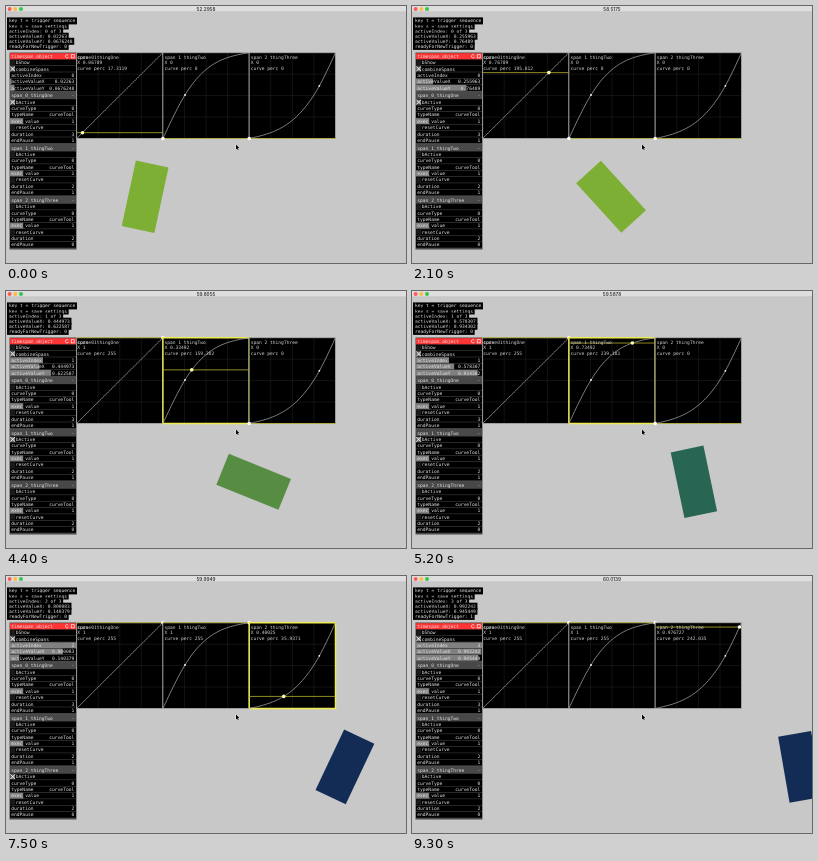
Write an HTML page with a canvas that moves like this. It is 400 px wide and 257 px high and loops after 9.4 s.

```html
<!DOCTYPE html>
<html lang="en">
<head>
<meta charset="utf-8">
<title>Timespan curves</title>
<style>
html, body { margin: 0; width: 100%; height: 100%; overflow: hidden; background: #c8c8c8; }
canvas { display: block; }
</style>
</head>
<body>
<canvas id="stage" width="400" height="257"></canvas>
<script>
const ctx = document.getElementById('stage').getContext('2d');
const LOOP = 9400, STEP = 100;
const ROW = 6.35, GUI_X = 4, GUI_W = 66;
const PLOT = { x: 70.6, y: 46.7, w: 86.3, h: 85.8 };

// knot: middle point of a natural cubic spline from (0,0) to (1,1)
const spans = [
  { name: 'thingOne', start: -0.20367, length: 3, end: 1, pause: 1, knot: null },
  { name: 'thingTwo', start: 3.73016, length: 2, end: 1, pause: 1, knot: [0.256, 0.5072] },
  { name: 'thingThree', start: 6.6995, length: 2, end: 0.976727, pause: 0, knot: [0.813, 0.614] }
];
const FINISH = 8.654;
const fpsKeys = [[0, 52.2958], [2.1, 58.5175], [3.6, 60.0232], [5.2, 59.5878],
  [6.8, 59.9831], [8.2, 60.0067], [9.3, 60.0139]];
const GREEN = [125, 175, 52], TEAL = [41, 101, 83], NAVY = [18, 44, 86];

const mix = (a, b, k) => a + (b - a) * k;
const clamp = (v, lo, hi) => Math.min(hi, Math.max(lo, v));
const num = v => String(Number(v.toPrecision(6)));

function curve(knot, x) {
  if (!knot) return x;
  const [a, b] = knot;
  const left = b / a, right = (1 - b) / (1 - a), bend = 3 * (right - left);
  if (x < a) return (left - a * bend / 6) * x + bend / (6 * a) * x ** 3;
  const u = 1 - x;
  return 1 - (right + (1 - a) * bend / 6) * u + bend / (6 * (1 - a)) * u ** 3;
}

function fpsAt(t) {
  const i = Math.max(1, fpsKeys.findIndex(k => k[0] >= t));
  const [t0, v0] = fpsKeys[i - 1], [t1, v1] = fpsKeys[i];
  return mix(v0, v1, (t - t0) / (t1 - t0));
}

function rect(x, y, w, h, fill) {
  ctx.fillStyle = fill;
  ctx.fillRect(x, y, w, h);
}

function dot(x, y, r, fill) {
  ctx.fillStyle = fill;
  ctx.beginPath();
  ctx.arc(x, y, r, 0, Math.PI * 2);
  ctx.fill();
}

function line(points, stroke, width) {
  ctx.strokeStyle = stroke;
  ctx.lineWidth = width;
  ctx.beginPath();
  points.forEach(([x, y]) => ctx.lineTo(x, y));
  ctx.stroke();
}

function text(str, x, y, align = 'left', fill = '#e4e4e4') {
  ctx.font = '4.6px "DejaVu Sans Mono", monospace';
  ctx.textAlign = align;
  ctx.textBaseline = 'middle';
  ctx.fillStyle = fill;
  ctx.fillText(str, x, y);
}

function stateAt(t) {
  const index = t >= FINISH ? 3 : spans.filter(s => t >= s.start).length - 1;
  const xs = spans.map(s => clamp((t - s.start) / s.length, 0, s.end));
  const ys = spans.map((s, i) => curve(s.knot, xs[i]));
  const current = Math.min(index, 2);
  return { index, xs, ys, valueX: (current + xs[current]) / 3, valueY: ys[current] * 255 / 256 };
}

function drawTitleBar(t) {
  rect(0, 0, 400, 6, '#dedede');
  rect(0, 5.6, 400, 0.5, '#b4b4b4');
  ['#fc5b57', '#fdbc40', '#34c84a'].forEach((c, i) => dot(3.6 + i * 5.7, 3, 2, c));
  ctx.font = '500 4.7px Inter, sans-serif';
  ctx.textAlign = 'center';
  ctx.textBaseline = 'middle';
  ctx.fillStyle = '#222';
  ctx.fillText(num(fpsAt(t)), 200, 3.1);
}

function drawStatus(s) {
  [
    'key t = trigger sequence',
    'key s = save settings',
    `activeIndex: ${s.index} of 3`,
    `activeValueX: ${num(s.valueX)}`,
    `activeValueY: ${num(s.valueY)}`,
    `readyForNewTrigger: ${s.index === 3 ? 1 : 0}`
  ].forEach((str, i) => {
    const y = 15.2 + i * 5.1;
    rect(1, y - 3.8, str.length * 2.77 + 3.5, 7, '#000');
    text(str, 3, y);
  });
}

function drawGui(s) {
  let y = 47.2;
  const row = (label, value, fill = 0) => {
    rect(GUI_X, y, GUI_W, ROW - 0.5, '#000');
    rect(GUI_X, y, GUI_W * Math.min(fill, 1), ROW - 0.5, '#808080');
    text(label, 5.3, y + 3.4);
    text(value, 68.2, y + 3.4, 'right');
    y += ROW;
  };
  const toggle = (label, on) => {
    rect(GUI_X, y, GUI_W, ROW - 0.5, '#000');
    rect(GUI_X + 0.2, y + 0.5, 4.9, 4.9, on ? '#777' : '#1a1a1a');
    if (on) {
      line([[4.3, y + 0.6], [9, y + 5.3]], '#fff', 0.8);
      line([[9, y + 0.6], [4.3, y + 5.3]], '#fff', 0.8);
    }
    text(label, 9.8, y + 3.4);
    y += ROW;
  };
  const header = (label, fill) => {
    rect(GUI_X, y, GUI_W, ROW, fill);
    text(label, 5.3, y + 3.4);
    y += ROW;
  };

  rect(GUI_X - 0.5, 46.5, GUI_W + 1, 197, '#4a4a4a');
  header('timespan_object', '#ff3434');
  ctx.strokeStyle = '#fff';
  ctx.lineWidth = 0.7;
  ctx.beginPath();
  ctx.arc(61, 50.3, 1.6, 0.4, 5.6);
  ctx.stroke();
  ctx.strokeRect(65.2, 48.7, 3, 3.2);
  toggle('bShow', false);
  toggle('combineSpans', true);
  row('activeIndex', s.index, s.index / 2);
  row('activeValueX', num(s.valueX), s.valueX);
  row('activeValueY', num(s.valueY), s.valueY);

  spans.forEach((span, i) => {
    y += 1.5;
    header(`span_${i}_${span.name}`, '#484848');
    text('-', 68.2, y - 3, 'right');
    toggle('bActive', s.index === i);
    row('curveType', 0);
    row('typeName', 'curveTool');
    row('exec_value', 1, 0.2);
    toggle('resetCurve', false);
    row('duration', span.length);
    row('endPause', span.pause);
  });
}

function drawPlot(span, i, s) {
  const { y, w, h } = PLOT, x = PLOT.x + i * w;
  const at = (px, py) => [x + px * w, y + (1 - py) * h];
  const active = s.index === i, px = s.xs[i], py = s.ys[i];
  // the first plot never gets the highlight frame
  const framed = active && i > 0;

  rect(x, y, w, h, '#000');
  for (let k = 1; k < 4; k++) {
    line([at(k / 4, 0), at(k / 4, 1)], '#202020', 0.6);
    line([at(0, k / 4), at(1, k / 4)], '#202020', 0.6);
  }
  line([at(0, 0), at(0, 1), at(1, 1), at(1, 0), at(0, 0)],
    framed ? '#eeec50' : '#b8b8b0', framed ? 1.5 : 0.7);
  line([at(0, py), at(1, py)], '#b5ae30', 0.8);

  const points = Array.from({ length: 61 }, (_, k) => at(k / 60, curve(span.knot, k / 60)));
  line(points, '#b4b4b4', 0.7);
  if (span.knot) dot(...at(...span.knot), 0.9, '#fff');
  dot(...at(px, py), 1.8, active ? '#fffcb0' : '#fff');

  const tx = x + (i ? 1.5 : 0.7);
  const label = (str, ty) => text(str, tx, ty, 'left', '#d0d0d0');
  label(`span ${i} ${span.name}`, 51.8);
  if (!i) label('curve 1', 51.3);
  label(`X ${num(px)}`, 57.1);
  label(`curve perc ${num(py * 255)}`, 62.4);
}

function drawBlock(s) {
  const k = s.xs[1], bend = 0.735;
  const color = GREEN.map((g, c) => Math.round(k < bend
    ? mix(g, TEAL[c], k / bend)
    : mix(TEAL[c], NAVY[c], (k - bend) / (1 - bend))));
  ctx.save();
  ctx.translate(133.3 + 257 * s.valueX, 190.8);
  ctx.rotate(s.valueY * Math.PI);
  rect(-16.7, -33.5, 33.4, 67, `rgb(${color})`);
  ctx.restore();
}

function drawCursor() {
  ctx.save();
  ctx.translate(230, 138.6);
  ctx.beginPath();
  [[0, 0], [0, 4.8], [1.1, 3.9], [1.9, 5.6], [2.7, 5.2], [1.9, 3.6], [3.3, 3.5]]
    .forEach(p => ctx.lineTo(...p));
  ctx.closePath();
  ctx.strokeStyle = '#fff';
  ctx.lineWidth = 0.7;
  ctx.stroke();
  ctx.fillStyle = '#000';
  ctx.fill();
  ctx.restore();
}

function draw() {
  const t = Math.floor(performance.now() % LOOP / STEP) * STEP / 1000;
  const s = stateAt(t);
  rect(0, 0, 400, 257, '#c8c8c8');
  drawBlock(s);
  drawStatus(s);
  drawGui(s);
  spans.forEach((span, i) => drawPlot(span, i, s));
  drawCursor();
  drawTitleBar(t);
  requestAnimationFrame(draw);
}
draw();
</script>
</body>
</html>
```
